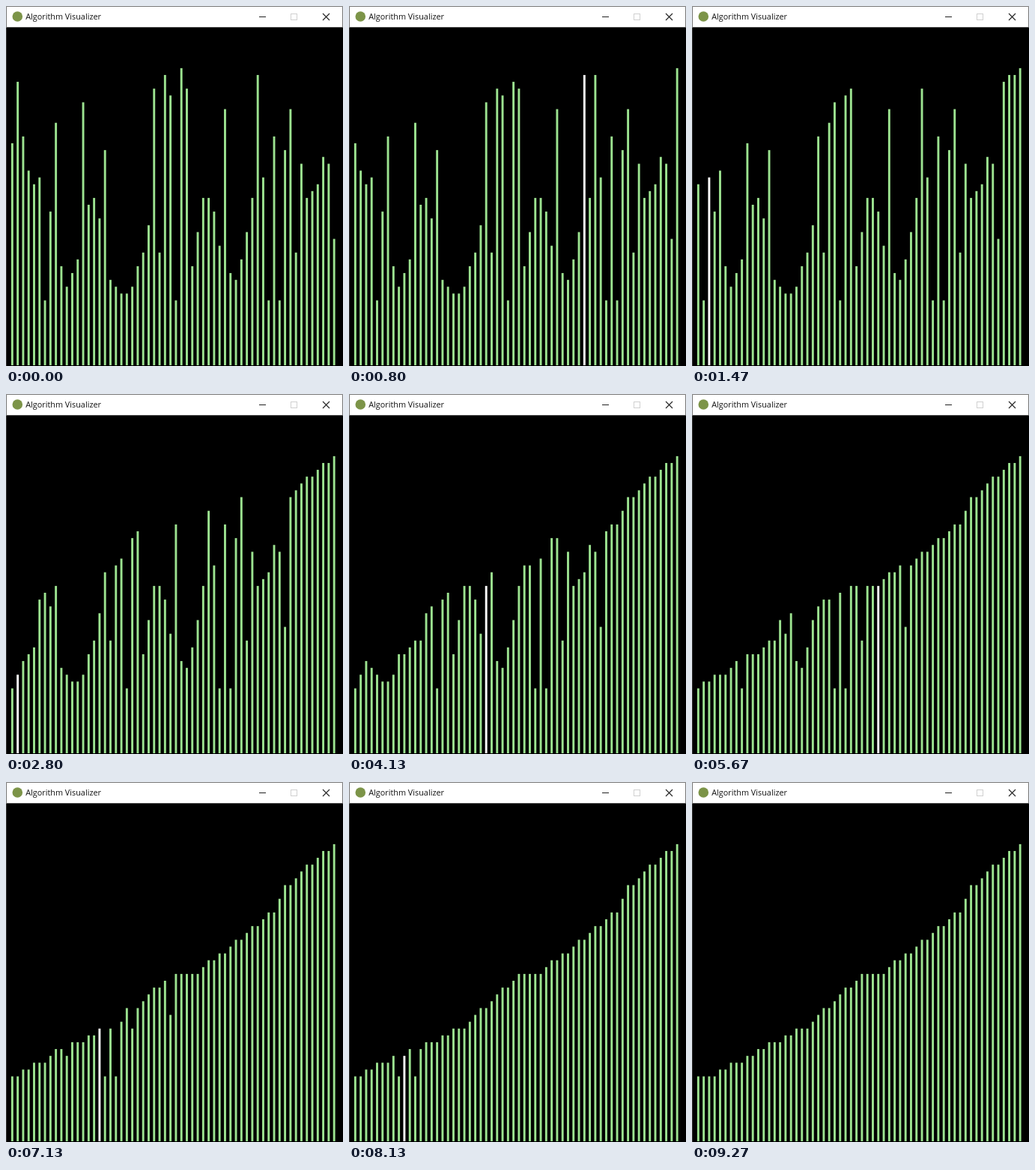
Write an HTML page that moves like this. It is 450 by 480 pixels and loops after 9340 ms.

```html
<!DOCTYPE html>
<html lang="en">
<head>
<meta charset="utf-8">
<title>Algorithm Visualizer</title>
<style>
  html, body { margin: 0; width: 100%; height: 100%; overflow: hidden; background: #000; }
  svg { display: block; width: 450px; height: 480px; }
  text { font: 10.85px "Open Sans", "Noto Sans", sans-serif; fill: #111; }
</style>
</head>
<body>
<svg viewBox="0 0 450 480">
  <rect width="450" height="480" fill="#000"/>
  <rect width="1" height="480" fill="#333"/>
  <rect width="450" height="28.3" fill="#fff"/>
  <path d="M.5 28.3V.5h449v27.8" fill="none" stroke="#777"/>
  <circle cx="15.3" cy="14" r="6.8" fill="#7c9448"/>
  <text x="26.2" y="18">Algorithm Visualizer</text>
  <g fill="none" stroke="#222">
    <path d="M338 14.5h9"/>
    <rect x="380.5" y="10.5" width="8" height="8" stroke="#d0d0d0"/>
    <path d="M423 10l9 9m0-9l-9 9" stroke-width="1.1"/>
  </g>
  <g id="bars"></g>
</svg>
<script>
const LOOP = 9340, COUNT = 60, GREEN = '#9ce390', WHITE = '#fff';

// Outline of the sorted heights: [slot, height]
const OUTLINE = [[0, -0.8], [20, 7.4], [30, 14.7], [34, 15.2], [48, 24.4], [50, 27.7], [59, 34]];
// Slots of the shortest and the tallest bars, both rising in height
const LOW = [6, 30, 47, 49];
const HIGH = [3, 53, 58, 57, 17, 50, 0, 48, 2, 8, 39, 51, 13, 29, 32, 26, 1, 28, 45, 31];

const slots = [...Array(COUNT).keys()];
const ripple = i => Math.cos(2 * Math.PI * (i - 4.7) / 10.3) + 0.7 * Math.cos(2 * Math.PI * i / 50);

function sortedHeight(i) {
  const k = Math.max(1, OUTLINE.findIndex(p => p[0] >= i));
  const [x0, y0] = OUTLINE[k - 1], [x1, y1] = OUTLINE[k];
  return Math.max(0, Math.round(y0 + (y1 - y0) * (i - x0) / (x1 - x0)));
}

// The bars between the extremes rise and fall in waves
function unsorted() {
  const middle = slots.filter(i => !LOW.includes(i) && !HIGH.includes(i))
                      .sort((a, b) => ripple(a) - ripple(b));
  const list = [];
  [...LOW, ...middle, ...HIGH].forEach((slot, rank) => { list[slot] = sortedHeight(rank); });
  return list;
}

// Bubble sort stopped after the given number of comparisons
function sortUntil(count) {
  const list = start.slice();
  let active = -1;
  for (let end = COUNT - 1; end > 0; end--) {
    for (let j = 0; j < end; j++) {
      if (count-- <= 0) return { list, active };
      if (list[j] > list[j + 1]) [list[j], list[j + 1]] = [list[j + 1], list[j]];
      active = j + 1;
    }
  }
  return { list, active: -1 };
}

const start = unsorted();
const group = document.getElementById('bars');
const bars = slots.map(i => {
  const bar = document.createElementNS('http://www.w3.org/2000/svg', 'rect');
  bar.setAttribute('x', 6.9 + 7.285 * i);
  bar.setAttribute('width', 2.9);
  return group.appendChild(bar);
});

let shown = -1;
function draw(ms) {
  // 15 pictures per second, on a clock of 10 ms
  const tick = Math.floor((Math.floor(ms / 10) + 0.5) * 0.15);
  if (tick === shown) return;
  shown = tick;
  const { list, active } = sortUntil(Math.round(13.16 * tick - 57.1));
  bars.forEach((bar, i) => {
    const top = 392.5 - 9.107 * list[i];
    bar.setAttribute('y', top);
    bar.setAttribute('height', 479 - top);
    bar.setAttribute('fill', i === active ? WHITE : GREEN);
  });
}

const begin = performance.now();
function loop() {
  draw(Math.max(0, performance.now() - begin) % LOOP);
  requestAnimationFrame(loop);
}
loop();
</script>
</body>
</html>
```
